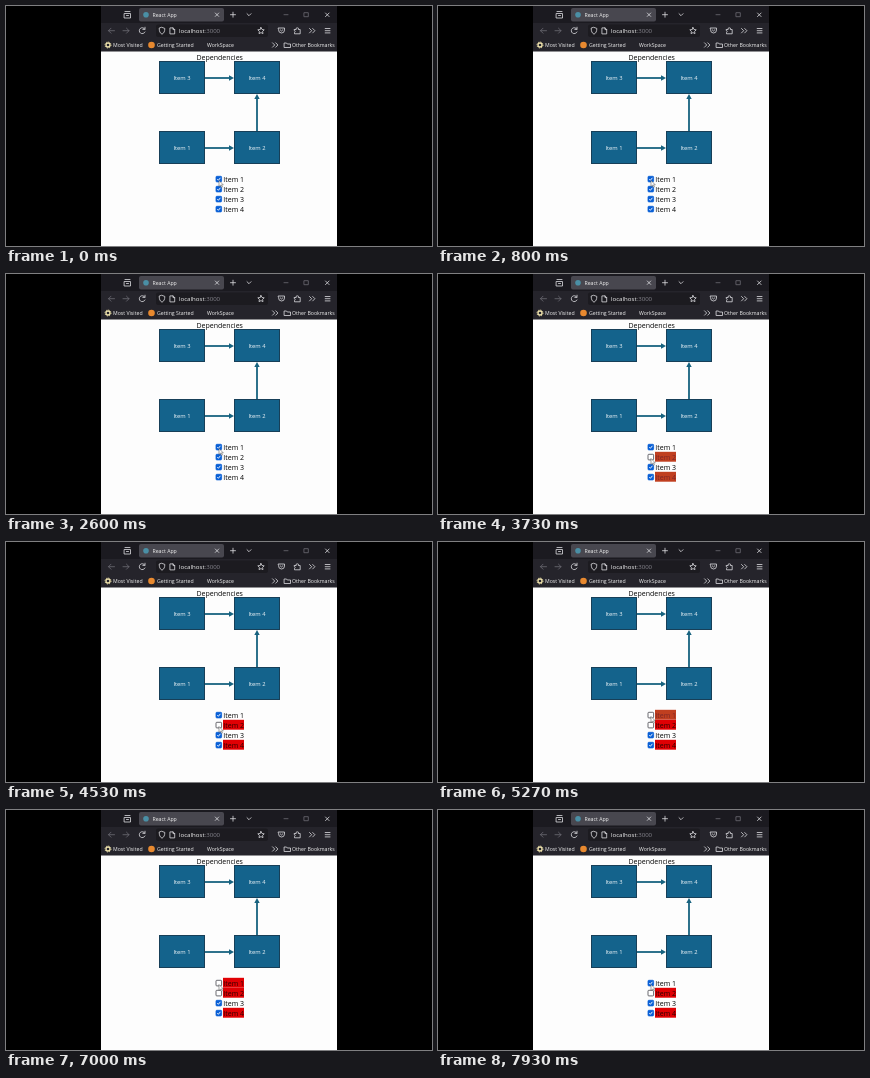
Animation of 426 by 240 pixels, one loop 8000 ms. Source, as an HTML page:

```html
<!DOCTYPE html>
<html lang="en">
<head>
<meta charset="utf-8">
<title>Dependencies</title>
<style>
  html, body { margin: 0; width: 100%; height: 100%; overflow: hidden; background: #000; }
  svg { display: block; width: 100%; height: 100%; }
  text { font-family: "Open Sans", "Noto Sans", sans-serif; }
  .chrome { font-size: 5.2px; fill: #f2f2f2; }
  .icon { fill: none; stroke: #dcdce0; stroke-width: .8; stroke-linecap: round; stroke-linejoin: round; }
  .dim { stroke: #6c6b74; }
  .node rect { fill: #14638c; stroke: #173f58; stroke-width: 1; }
  .node text { font-size: 5.8px; font-weight: 500; fill: #f4f8fa; text-anchor: middle; }
  .link { stroke: #17627f; stroke-width: 1.8; }
  .page { font-size: 7px; font-weight: 500; fill: #060606; }
</style>
</head>
<body>
<svg viewBox="0 0 426 240">
  <rect width="426" height="240"/>
  <rect x="95" width="236" height="240" fill="#fdfdfd"/>

  <!-- Browser window -->
  <rect x="95" width="236" height="17" fill="#1b1a20"/>
  <rect x="95" y="17" width="236" height="28.5" fill="#25242b"/>
  <rect x="133" y="2" width="85" height="13.5" rx="2" fill="#48474f"/>
  <rect x="150" y="18.5" width="112" height="12.5" rx="2" fill="#1c1b20"/>
  <circle cx="140" cy="8.7" r="2.8" fill="#4a8fa5"/>
  <circle cx="145.5" cy="39" r="3.3" fill="#e8892f"/>
  <g class="icon">
    <path d="M119 5.5h5M118.500 7.5h6v4.500h-6zM120.500 9.500h2"/>
    <path d="M209.300 7l3.400 3.400m0-3.400l-3.400 3.400M224.500 8.700h5m-2.500-2.500v5M241 7.700l2 2 2-2"/>
    <path class="dim" d="M278 8.700h4M298.300 6.700h4v4h-4z"/>
    <path d="M319.500 7l3.600 3.600m0-3.600l-3.600 3.600"/>
    <path class="dim" d="M108.500 24.700h-6m2.500-2.500l-2.500 2.500 2.500 2.500M117 24.700h6m-2.500-2.500l2.500 2.500-2.500 2.500"/>
    <path d="M138.800 23a3 3 0 1 0 .2 3M139 21.200v2.200h-2.200"/>
    <path d="M156 21.400l2.800 1c0 3-.8 4.700-2.800 5.800-2-1.100-2.800-2.800-2.800-5.800z"/>
    <path d="M164.300 21.900h2.700l1.700 1.700v4.300h-4.400zM167 21.900v1.700h1.700"/>
    <path d="M255 21.500l1 2 2.200.3-1.600 1.600.4 2.200-2-1-2 1 .4-2.200-1.600-1.600 2.200-.3z"/>
    <path d="M272.500 22h6v2a3 3 0 0 1-6 0zM274.100 23.700l1.400 1.300 1.400-1.300"/>
    <path d="M288.500 23.500h1.700a1.200 1.200 0 1 1 2.200 0h1.800v4.300h-5.700v-1.300a1.100 1.100 0 0 0 0-2z"/>
    <path d="M303.500 22.500l2.200 2.200-2.200 2.200M306.700 22.500l2.200 2.200-2.200 2.200"/>
    <path d="M319.200 22.500h4.800M319.200 24.700h4.800M319.200 26.900h4.800"/>
    <path d="M266.500 36.800l2.200 2.200-2.200 2.200M269.700 36.800l2.200 2.200-2.200 2.200"/>
    <path d="M278.500 37h2l.8 1h3.200v3.500h-6z"/>
  </g>
  <circle cx="102" cy="39" r="2" fill="none" stroke="#efe3ac" stroke-width="1.3"/>
  <circle cx="102" cy="39" r="3" fill="none" stroke="#efe3ac" stroke-width=".9" stroke-dasharray="1.2 1.156"/>
  <g class="chrome">
    <text x="146.500" y="10.800">React App</text>
    <text x="173" y="27" style="font-size:6.1px">localhost<tspan fill="#85848c">:3000</tspan></text>
    <text x="107" y="41">Most Visited</text>
    <text x="151" y="41">Getting Started</text>
    <text x="201" y="41">WorkSpace</text>
    <text x="286" y="41">Other Bookmarks</text>
  </g>

  <text class="page" x="213.700" y="53.500" text-anchor="middle">Dependencies</text>
  <g id="diagram"></g>
  <g id="list" class="page"></g>
  <path id="cursor" d="M0 0v6l1.400-1.300 1 2.200 1-.5-1-2h1.900z" fill="#fff" stroke="#444" stroke-width=".5"/>
</svg>
<script>
const LOOP = 8000;
const FADE = 130;
const NEEDS = { 1: [], 2: [1], 3: [], 4: [2, 3] };
// Intervals during which an item is unchecked.
const UNCHECKED = { 1: [[870, 2270], [5200, 7070]], 2: [[3650, LOOP]], 3: [], 4: [] };

const make = (parent, tag, attrs, text = "") => {
  const el = document.createElementNS("http://www.w3.org/2000/svg", tag);
  for (const key in attrs) el.setAttribute(key, attrs[key]);
  el.textContent = text;
  return parent.appendChild(el);
};
const byId = id => document.getElementById(id);

function addNode(id, x, y) {
  const node = make(byId("diagram"), "g", { class: "node" });
  make(node, "rect", { x: x + .5, y: y + .5, width: 45, height: 32 });
  make(node, "text", { x: x + 23, y: y + 19 }, "Item " + id);
}

function addLink(x, y, length, angle) {
  const link = make(byId("diagram"), "g", { transform: `translate(${x} ${y}) rotate(${angle})` });
  make(link, "path", { class: "link", d: `M0 0H${length - 4}` });
  make(link, "path", { fill: "#17627f", d: `M${length} 0l-5 -2.700v5.400z` });
}

addNode(3, 153, 55);
addNode(4, 228, 55);
addNode(1, 153, 125);
addNode(2, 228, 125);
addLink(199, 72, 29, 0);
addLink(199, 142, 29, 0);
addLink(251, 125, 37, -90);

const rows = [1, 2, 3, 4].map(id => {
  const y = 163 + id * 10;
  const list = byId("list");
  return {
    id,
    back: make(list, "rect", { x: 217, y: y - 5.200, width: 21, height: 9.900 }),
    box: make(list, "rect", { x: 210, y: y - 2.700, width: 5.600, height: 5.600, rx: .8, "stroke-width": .8 }),
    tick: make(list, "path", { d: `M211.300 ${y + .1}l1.100 1.200 2-2.500`, fill: "none", stroke: "#fff", "stroke-width": .9 }),
    label: make(list, "text", { x: 217.300, y: y + 2.700 }, "Item " + id)
  };
});

const activeSpan = (id, t) => UNCHECKED[id].find(([from, to]) => t >= from && t < to);

// Earliest time since which an item or anything it depends on is unchecked.
function blockedSince(id, t) {
  const span = activeSpan(id, t);
  return Math.min(span ? span[0] : Infinity, ...NEEDS[id].map(need => blockedSince(need, t)));
}

const ease = (t, from, to) => {
  const p = Math.min(1, Math.max(0, (t - from) / (to - from)));
  return p * p * (3 - 2 * p);
};

function draw(t) {
  for (const { id, back, box, tick, label } of rows) {
    const checked = !activeSpan(id, t);
    const since = blockedSince(id, t);
    const blocked = since < Infinity;
    const fading = blocked && t - since < FADE;
    back.setAttribute("visibility", blocked ? "visible" : "hidden");
    back.setAttribute("fill", fading ? "#c03f20" : "#e00004");
    label.setAttribute("fill", fading ? "#7d2626" : blocked ? "#300000" : "#060606");
    box.setAttribute("fill", checked ? "#0a60d6" : "#fff");
    box.setAttribute("stroke", checked ? "#0a60d6" : "#44444c");
    tick.setAttribute("visibility", checked ? "visible" : "hidden");
  }
  const y = 174.500 + 10 * (ease(t, 2800, 3400) - ease(t, 4600, 5150));
  byId("cursor").setAttribute("transform", `translate(213 ${y})`);
}

function frame(now) {
  draw(now % LOOP);
  requestAnimationFrame(frame);
}
requestAnimationFrame(frame);
</script>
</body>
</html>
```
